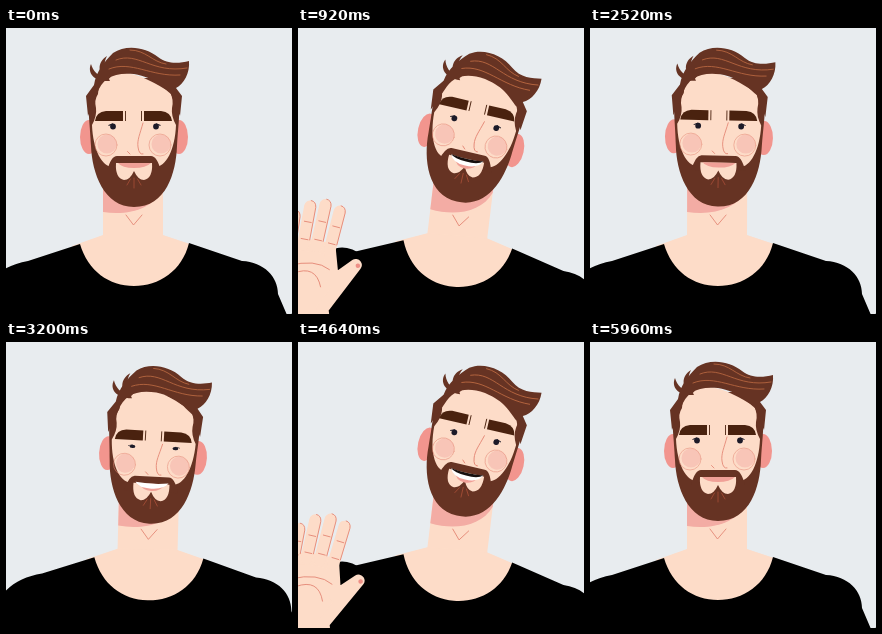
Recreate the animation shown at these times as an HTML page. Size 286 by 286 pixels, loop 6 s.

```html
<!DOCTYPE html>
<html lang="en">
<head>
<meta charset="utf-8">
<title>Waving man</title>
<style>
  html, body { margin: 0; width: 100%; height: 100%; overflow: hidden; background: #e8ecef; }
  svg { display: block; width: 100vw; height: 100vh; }
  .skin { fill: #fddcc8; }
  .hair { fill: #663323; }
  .line { fill: none; stroke: #e58a78; stroke-width: .9; stroke-linecap: round; stroke-linejoin: round; }
  .strand { fill: none; stroke: #b5653f; stroke-width: .9; stroke-linecap: round; }
  .limb { stroke: #fddcc8; stroke-width: 12; stroke-linecap: round; stroke-linejoin: round; }
</style>
</head>
<body>
<svg viewBox="0 0 286 286">
  <g id="body">
    <g id="neck">
      <path class="skin" d="M97 130H157V215H97Z"/>
      <path fill="#f3aca4" d="M97 140H157V160C148 181 122 188 97 184Z"/>
      <path class="line" d="M120 187 127.500 197 136 187"/>
    </g>
    <path class="skin" d="M97 207H157L190 218 183 262H74L66 218Z"/>
    <path id="sleeve" d="M16 257-16 284" stroke="#000" stroke-width="57" stroke-linecap="round"/>
    <path d="M74 216C82 243 103 258 128 258S176 243 183 215L236 233C258 234 272 249 272 266L281 287 300 282V330H-30V280C-20 250-4 238 22 233Z"/>
  </g>

  <g id="head">
    <g id="ears" fill="#f2958e">
      <ellipse cx="83" cy="109" rx="9" ry="17"/>
      <ellipse cx="173" cy="109" rx="9" ry="17"/>
    </g>
    <path class="hair" d="M96 50 83 74C82 87 84 96 85 118 86 145 98 179 128 179 160 179 170 145 171 118 172 100 174 87 173 74L160 50Z"/>
    <path class="skin" d="M92 66C94 45 106 43 118 45 135 46 150 56 164 64Q168 72 166 80 165 88 170 97C169 122 160 139 149 139H107C96 139 87 122 86 97Q91 88 90 80 88 72 92 66Z"/>
    <g id="hair">
      <path class="hair" d="M85 36C81 45 88 54 104 53L102 49C92 49 87 43 85 36ZM101 28C91 34 91 46 102 52L107 46C98 43 97 35 101 28Z"/>
      <path class="hair" d="M82 88 80 68 88 57C90 44 98 34 107 25 120 16 140 19 152 29 162 37 174 35 183 33 184 45 178 56 170 60L176 68 174 88 165 66C155 58 150 50 128 46 108 44 96 50 91 66Z"/>
      <path class="strand" d="M110 32C132 23 146 46 181 40M103 41C125 32 145 49 174 47M124 22C140 22 146 34 160 36"/>
    </g>

    <g id="face">
      <g fill="#f8c5b7">
        <circle cx="101" cy="116" r="9.500"/>
        <circle cx="155" cy="116" r="9.500"/>
      </g>
      <g class="line" opacity=".6">
        <circle cx="100" cy="117" r="11"/>
        <circle cx="154" cy="117" r="11"/>
      </g>
      <path class="line" d="M137 95C134 106 131 112 132 119Q133 127 137 126M121.500 123.500 124 126"/>
      <g id="eyes" fill="#1c1a28">
        <circle cx="107" cy="98.500" r="2.900"/>
        <circle cx="150" cy="98.500" r="2.900"/>
        <path d="M102.500 97.500 107 95.800M154.500 97.500 150 95.800" stroke="#1c1a28"/>
      </g>
      <g id="brows" fill="#4a220f">
        <path d="M89 93Q90 84 100 83H117V93Z"/>
        <path d="M166 93Q165 84 155 83H138V93Z"/>
        <path d="M119.500 83V93M135.500 83V93" stroke="#4a220f" stroke-width=".9"/>
      </g>
      <path class="hair" d="M101 143Q105 128 111 128H145Q151 128 155 143Z"/>
      <path class="skin" d="M110 135H146Q147 150 138 152 132 152 128 143 124 152 118 152 109 150 110 135Z"/>
      <path id="lip" fill="#f0a097" d="M112 135H145Q140 140 128 140T112 135Z"/>
      <g id="smile">
        <path fill="#f0a097" d="M116 136H141Q137 145 128 145T116 136Z"/>
        <path fill="#fff" d="M112 134Q128 137 145 134 141 142 128 142T112 134Z"/>
        <path id="gap" fill="#17100f" d="M112 134Q128 136 145 134 140 138.500 128 138T112 134Z"/>
      </g>
      <path class="line" style="stroke:#a04b35" d="M128 150V160M124.500 151 121 157M131.500 151 135 157"/>
    </g>
  </g>

  <g id="hand"></g>
</svg>
<script>
const $ = id => document.getElementById(id);
const LOOP = 3000;

const clamp = v => Math.max(0, Math.min(1, v));
const mix = (a, b, k) => a + (b - a) * k;
const ramp = (t, from, to) => {
  const u = clamp((t - from) / (to - from));
  return u * u * (3 - 2 * u);
};
const bump = (t, middle, reach) => clamp(1 - Math.abs(t - middle) / reach);

// A point reached from (x, y) at a clockwise angle from straight up
const reach = (x, y, degrees, length) => {
  const a = degrees * Math.PI / 180;
  return [x + Math.sin(a) * length, y - Math.cos(a) * length];
};

// bend 0: spread open palm, bend 1: fingers together, thumb upright
function handShape(bend) {
  const bases = [], tips = [];
  let creases = "";
  for (let i = 0; i < 4; i++) {
    const x = mix(4 + 13 * i, 44 + 6.5 * i, bend);
    const y = mix(215 + i * i, 238 + 2 * i, bend);
    const angle = 16 + 2 * i + 10 * bend;
    const length = 42 - 3 * (i - 2) ** 2;
    const at = (along, side) => reach(...reach(x, y, angle, along), angle + 90, side);
    bases.push([x, y]);
    tips.push(at(length, 0));
    for (const part of [.15, .6]) creases += `M${at(length * part, -3)}L${at(length * part, 4)}`;
    creases += `M${at(6, 5.7)}L${at(length, 5.7)}Q${at(length + 6, 5)} ${at(length + 6, 0)}`;
  }
  const thumb = [mix(42, 78, bend), mix(256, 274, bend)];
  const thumbTip = reach(...thumb, 62 - 38 * bend, 28);
  const wristY = mix(282, 292, bend), right = mix(28, 80, bend), left = mix(-26, 36, bend);
  const palm = [...bases, thumb, thumbTip, [right, wristY], [right, 420], [left, 420], [left, wristY]];
  const fingers = bases.map((b, i) => `M${b}L${tips[i]}`).join("");

  const [x0, y0] = bases[0], [x3, y3] = bases[3];
  creases += `M${x0 - 4} ${y0 + 20}Q${mix(x0, x3, .6)} ${y0 + 16} ${x3 - 3} ${y3 + 20}`
    + `M${x0} ${y0 + 28}Q${mix(x0, x3, .6)} ${y0 + 22} ${x3 - 14} ${y3 + 36}`;
  return `<polygon class="skin limb" points="${palm}"/><path class="limb" d="${fingers}"/>`
    + `<circle cx="${thumbTip[0] + 2}" cy="${thumbTip[1] + 1}" r="2.300" fill="#ee8f86"/>`
    + `<path class="line" d="${creases}"/>`;
}

const set = (id, value) => $(id).setAttribute("transform", value);

function draw(time) {
  const t = time % LOOP;
  const between = (a, b, c, d) => ramp(t, a, b) - ramp(t, c, d);

  // The lean leads, the head turn and brows follow
  const lean = 35 * between(0, 420, 1880, 2340);
  const turn = 13 * between(0, 640, 1740, 2690);
  const smile = between(0, 300, 1880, 2220);
  const lift = 5 * between(100, 500, 2000, 2600);
  const raise = between(250, 600, 2000, 2150);
  const bend = ramp(t, 1750, 2000);
  const nodIn = ramp(bump(t, 220, 220), 0, 1), nodOut = ramp(bump(t, 2080, 240), 0, 1);
  const blink = .85 * (bump(t, 250, 100) + bump(t, 2050, 100));

  set("body", `translate(${lean * .86} ${lean / 45}) rotate(${lean * lean / 250} 128 230)`);
  set("neck", `rotate(${turn * .15} 128 215)`);
  set("sleeve", `translate(${(1 - raise) * 20} ${(1 - raise) * 20})`);

  set("head", `translate(${lean} ${4 * (nodIn + nodOut) - turn * .38}) rotate(${turn} 128 160)`);
  for (const id of ["ears", "hair"]) set(id, `translate(0 ${turn * .55})`);
  set("face", `translate(0 ${4 * nodIn})`);
  set("brows", `translate(0 ${-lift})`);
  set("eyes", `translate(0 ${99 * blink}) scale(1 ${1 - blink})`);

  set("smile", `translate(0 ${134 * (1 - smile)}) scale(1 ${smile})`);
  $("smile").style.opacity = clamp(smile * 3);
  $("lip").style.opacity = 1 - smile;
  $("gap").style.opacity = clamp(smile * 5 - 4);

  const wave = (-3.5 - 15 * Math.sin((t - 900) * Math.PI / 250)) * (1 - bend);
  $("hand").innerHTML = raise > .01 ? handShape(bend) : "";
  set("hand", `translate(${-20 * (1 - raise)} ${130 * (1 - raise)}) rotate(${wave} 17 309)`);
}

const start = performance.now();
function frame() {
  draw(performance.now() - start);
  requestAnimationFrame(frame);
}
frame();
</script>
</body>
</html>
```
